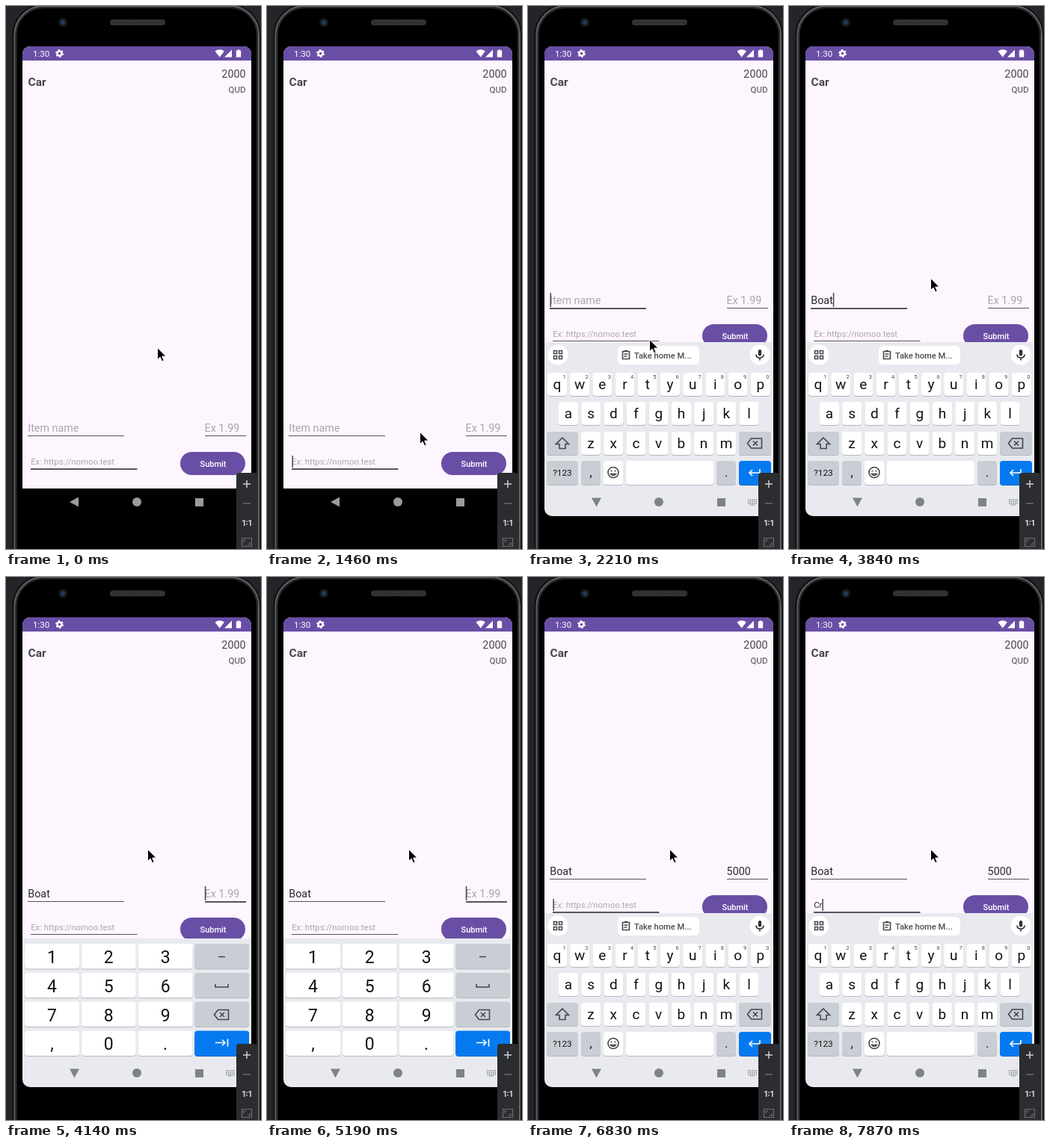
An HTML page for the animation above (8 s loop, 341 px wide and 727 px high).

```html
<!DOCTYPE html>
<html lang="en">
<head>
<meta charset="utf-8">
<title>Adding an item</title>
<style>
  html, body { margin: 0; width: 100%; height: 100%; overflow: hidden; background: #242528; }
  svg { display: block; width: 341px; height: 727px; }
  text { font-family: Roboto, sans-serif; white-space: pre; }
  .mid { text-anchor: middle; }
  .end { text-anchor: end; }
  .icon { fill: none; stroke: #44474c; stroke-width: 1.6; }
</style>
</head>
<body>
<svg viewBox="0 0 341 727">
  <defs>
    <clipPath id="screen"><rect x="22" y="54" width="306" height="629" rx="10"/></clipPath>
    <pattern id="mesh" width="3" height="3" patternUnits="userSpaceOnUse">
      <rect width="3" height="3" fill="#1d1d1d"/><path d="M0 3L3 0M0 0L3 3" stroke="#4a4a4a" stroke-width=".8"/>
    </pattern>
  </defs>

  <!-- phone body -->
  <rect x="10" y="-1" width="329" height="800" rx="40" stroke="#131415" stroke-width="4"/>
  <rect x="11.5" y="0" width="326.500" height="800" rx="39" stroke="#626367" stroke-width="2"/>
  <rect x="13.5" y="2" width="322.500" height="800" rx="37" stroke="#2b2c2e" stroke-width="2"/>
  <circle cx="76" cy="22" r="6" fill="#17191f"/>
  <circle cx="76" cy="22" r="3" fill="#26395c"/>
  <rect x="139" y="18" width="74" height="8" rx="4" fill="url(#mesh)"/>

  <g clip-path="url(#screen)">
    <rect x="22" y="54" width="306" height="592" fill="#fef6ff"/>
    <rect x="22" y="54" width="306" height="19" fill="#694ea5"/>
    <g fill="#fff">
      <text x="36" y="68" font-size="11.5">1:30</text>
      <circle cx="71.5" cy="63.5" r="3" fill="none" stroke="#fff" stroke-width="2.4"/>
      <circle cx="71.5" cy="63.5" r="4.6" fill="none" stroke="#fff" stroke-width="1.6" stroke-dasharray="2.4 2.42"/>
      <path d="M279.5 60.5q6.2-4.6 12.4 0L285.7 68.5zM302 58.5v10h-10zM309.5 59.5v-1h3v1h1.7v9h-6.4v-9z"/>
    </g>
    <g fill="#49454f">
      <text x="29.5" y="107" font-size="15.5" font-weight="700">Car</text>
      <text x="320.5" y="96" font-size="14.3" class="end">2000</text>
      <text x="320.5" y="116" font-size="11.5" class="end">QUD</text>
    </g>
    <g id="form">
      <rect x="233" y="597" width="87" height="31" rx="15.5" fill="#694ea5"/>
      <text x="277" y="617" font-size="11" font-weight="500" fill="#fff" class="mid">Submit</text>
      <rect id="caret" width="1.5" fill="#4a4458"/>
    </g>
    <g id="letters"></g>
    <g id="numbers"></g>
    <g id="nav">
      <path id="back" d="M85 664l12-6.5v13z"/>
      <circle cx="175" cy="664" r="6"/>
      <rect x="253" y="659" width="11" height="11"/>
    </g>
    <path id="imeIcon" d="M294 661h12M294 663.500h12M294 666h12M297 668h6" fill="none"
          stroke="#8c8f94" stroke-width="1.4" stroke-dasharray="1.6 1"/>
  </g>

  <!-- zoom controls -->
  <rect x="308" y="625" width="28" height="110" rx="4" fill="#2b2d30"/>
  <g fill="none" stroke="#ced0d6" stroke-width="1.5">
    <path d="M317 640h10M322 635v10"/>
    <path d="M317 666h10" stroke="#6b6d72"/>
    <path d="M315.500 712.500h13v11h-13zM318 718v-3h3M326 718v3h-3" stroke="#6b6d72" stroke-width="1.2"/>
  </g>
  <text x="322" y="696" font-size="11" font-weight="700" fill="#ced0d6" class="mid" style="font-family: Inter, sans-serif">1:1</text>

  <path id="mouse" d="M.5.5v16l3.600-3.400 2.500 5.700 2.600-1.100-2.500-5.600h5.200z" stroke="#fff"/>
</svg>

<script>
const LOOP = 8000, STEP = 146;
const $ = id => document.getElementById(id);
const show = (el, on) => el.setAttribute('visibility', on ? 'visible' : 'hidden');

// Keyboards
const GREY = '#c9cdd4', BLUE = '#057af0';
const label = (x, y, size, str, fill = '#111214') =>
  `<text x="${x}" y="${y}" font-size="${size}" fill="${fill}" class="mid">${str}</text>`;
const key = (x, y, w, h, fill = '#fff') =>
  `<rect x="${x}" y="${y + 1}" width="${w}" height="${h}" rx="4" fill="${fill === BLUE ? '#0563c4' : '#b4b8bf'}"/>` +
  `<rect x="${x}" y="${y}" width="${w}" height="${h}" rx="4" fill="${fill}"/>`;
const icon = (d, stroke = '#44474c') => `<path d="${d}" class="icon" style="stroke:${stroke}"/>`;
const panel = y => `<rect x="22" y="${y}" width="306" height="${683 - y}" fill="#e8eaef"/>`;
const erase = (x, y) => icon(`M${x - 10} ${y}l5-6.5h14v13h-14zM${x - 2.5} ${y - 3}l6 6m0-6l-6 6`);

function letterKeys() {
  let s = panel(450);
  s += '<circle cx="40" cy="467" r="13.5" fill="#fff"/><circle cx="310" cy="467" r="13.5" fill="#fff"/>';
  s += '<rect x="120" y="455" width="109" height="25" rx="6" fill="#fff"/>';
  s += icon('M34.5 461.5h4v4h-4zM41.5 461.5h4v4h-4zM34.5 468.5h4v4h-4zM41.5 468.5h4v4h-4z');
  s += icon('M126.5 462.5h9v10h-9zM129 461.5h4M128.5 466h5M128.5 469h3.5');
  s += '<rect x="307.8" y="460" width="4.4" height="8.5" rx="2.2" fill="#303236"/>';
  s += icon('M305 466.5q0 4.5 5 4.5t5-4.5M310 471v3.5', '#303236');
  s += '<text x="142" y="471.5" font-size="11.2" font-weight="500" fill="#4a4d52">Take home M...</text>';

  [['qwertyuiop', 39, 491], ['asdfghjkl', 54, 530], ['zxcvbnm', 84, 570]].forEach(([row, x0, y], r) =>
    [...row].forEach((ch, i) => {
      const x = x0 + i * 30.2;
      s += key(x - 13, y, 26, 31) + label(x, y + 22, 19, ch);
      if (!r) s += label(x + 9.5, y + 8, 7.5, (i + 1) % 10, '#44474c');
    }));

  s += key(25, 570, 42, 31, GREY) + icon('M46 578l8.5 8.5h-4.5v6h-8v-6h-4.5z');
  s += key(282, 570, 43, 31, GREY) + erase(303.5, 585.5);
  s += key(25, 609, 42, 32, GREY) + label(46, 629, 11.8, '?123');
  s += key(71, 609, 26, 32, GREY) + label(84, 630, 16, ',');
  s += key(101, 609, 26, 32) + '<circle cx="114" cy="624.5" r="7" class="icon"/>';
  s += icon('M110.5 622.5h2M115.5 622.5h2M110.5 626.5q3.5 4 7 0z');
  s += key(131, 609, 117, 32);
  s += key(252, 609, 26, 32, GREY) + label(265, 630, 16, '.');
  s += key(282, 609, 43, 32, BLUE) + icon('M310 620v5h-14m4-4l-4 4 4 4', '#fff');
  return s;
}

function numberKeys() {
  let s = panel(484);
  ['123', '456', '789', ',0.'].forEach((row, r) => {
    const y = 491 + r * 38.8;
    [...row].forEach((ch, c) => {
      const x = 25 + c * 75.8;
      s += key(x, y, 73, 33.5) + label(x + 36.5, y + 26, 23, ch);
    });
    s += key(252.3, y, 72.7, 33.5, r < 3 ? GREY : BLUE);
  });
  s += icon('M284 508.5h9') + icon('M280 545v4h17v-4') + erase(288.5, 586);
  return s + icon('M280 623.5h13m-4-4l4 4-4 4M296.5 618.5v10', '#fff');
}
$('letters').innerHTML = letterKeys();
$('numbers').innerHTML = numberKeys();

// Form fields: typed holds [time, value] pairs
const fields = {
  item: { x: 29.3, y: 570, size: 14.3, line: [29, 158, 575], caret: [555, 19], hint: 'Item name',
    typed: [[0, ''], [3250, 'B'], [3550, 'Boa'], [3840, 'Boat']] },
  price: { x: 265.6, y: 570, size: 14.3, line: [266, 321, 575], caret: [555, 19], hint: 'Ex 1.99',
    typed: [[0, ''], [5790, '5'], [6090, '50'], [6240, '500'], [6380, '5000']] },
  link: { x: 33.2, y: 614, size: 11.3, line: [33, 175.5, 619], caret: [602, 16], hint: 'Ex: https://nomoo.test',
    typed: [[0, ''], [7570, 'C'], [7870, 'Cr']] },
};
const add = (tag, attrs) => {
  const el = document.createElementNS('http://www.w3.org/2000/svg', tag);
  for (const k in attrs) el.setAttribute(k, attrs[k]);
  return $('form').insertBefore(el, $('caret'));
};
for (const f of Object.values(fields)) {
  const [x1, x2, y] = f.line;
  f.text = add('text', { x: f.x, y: f.y, 'font-size': f.size });
  f.rule = add('rect', { x: x1, y, width: x2 - x1, fill: '#57525f' });
}

// Timeline
const focus = [[0, 'link'], [1760, 'item'], [4140, 'price'], [6680, 'link']];
const keyboard = [[0, ''], [1900, 'letters'], [4140, 'numbers'], [6830, 'letters']];
const lift = { '': 0, letters: -171, numbers: -141 };
const blinks = [440, 880, 1310, 2510, 2950, 4590, 5190, 5640, 5790, 7280, 7570];
// Pointer: step, x, y
const pointer = [[1, 202, 457], [3, 224, 230], [5, 231, 135], [7, 224, 250], [9, 206, 520], [10, 204, 570],
  [12, 130, 564], [13, 128, 562], [14, 140, 520], [15, 162, 446], [16, 186, 370], [17, 189, 364]];

const latest = (list, t) => list.filter(e => e[0] <= t).pop()[1];

function pointerAt(n) {
  const i = pointer.findIndex(p => p[0] > n);
  if (i < 0) return pointer[pointer.length - 1].slice(1);
  if (!i) return pointer[0].slice(1);
  const a = pointer[i - 1], b = pointer[i], k = (n - a[0]) / (b[0] - a[0]);
  return [a[1] + (b[1] - a[1]) * k, a[2] + (b[2] - a[2]) * k];
}

function draw(t) {
  const step = Math.floor((t + 4) / STEP);
  const active = latest(focus, t), board = latest(keyboard, t);

  $('form').setAttribute('transform', `translate(0 ${lift[board]})`);
  for (const [name, f] of Object.entries(fields)) {
    const value = latest(f.typed, t);
    f.text.textContent = value || f.hint;
    f.text.setAttribute('fill', value ? '#2b2930' : '#aaa5ad');
    f.rule.setAttribute('height', name === active ? 2 : 1);
    if (name === active) {
      const [y, height] = f.caret;
      $('caret').setAttribute('x', f.x + (value ? f.text.getComputedTextLength() : 0.2));
      $('caret').setAttribute('y', y);
      $('caret').setAttribute('height', height);
    }
  }
  show($('caret'), blinks.filter(b => b <= t).length % 2);

  const hidden = Math.max(0, 1 - (step - 12) / 2);
  $('letters').setAttribute('transform', `translate(0 ${233 * hidden ** 2})`);
  show($('letters'), board === 'letters');
  show($('numbers'), board === 'numbers');
  show($('imeIcon'), board);
  $('nav').setAttribute('fill', board ? '#7f8287' : '#9b9b9b');
  $('back').setAttribute('transform', board ? 'rotate(-90 91.5 664)' : '');

  $('mouse').setAttribute('transform', `translate(${pointerAt(step)})`);
}

function tick(now) {
  draw(now % LOOP);
  requestAnimationFrame(tick);
}
draw(0);
requestAnimationFrame(tick);
</script>
</body>
</html>
```
